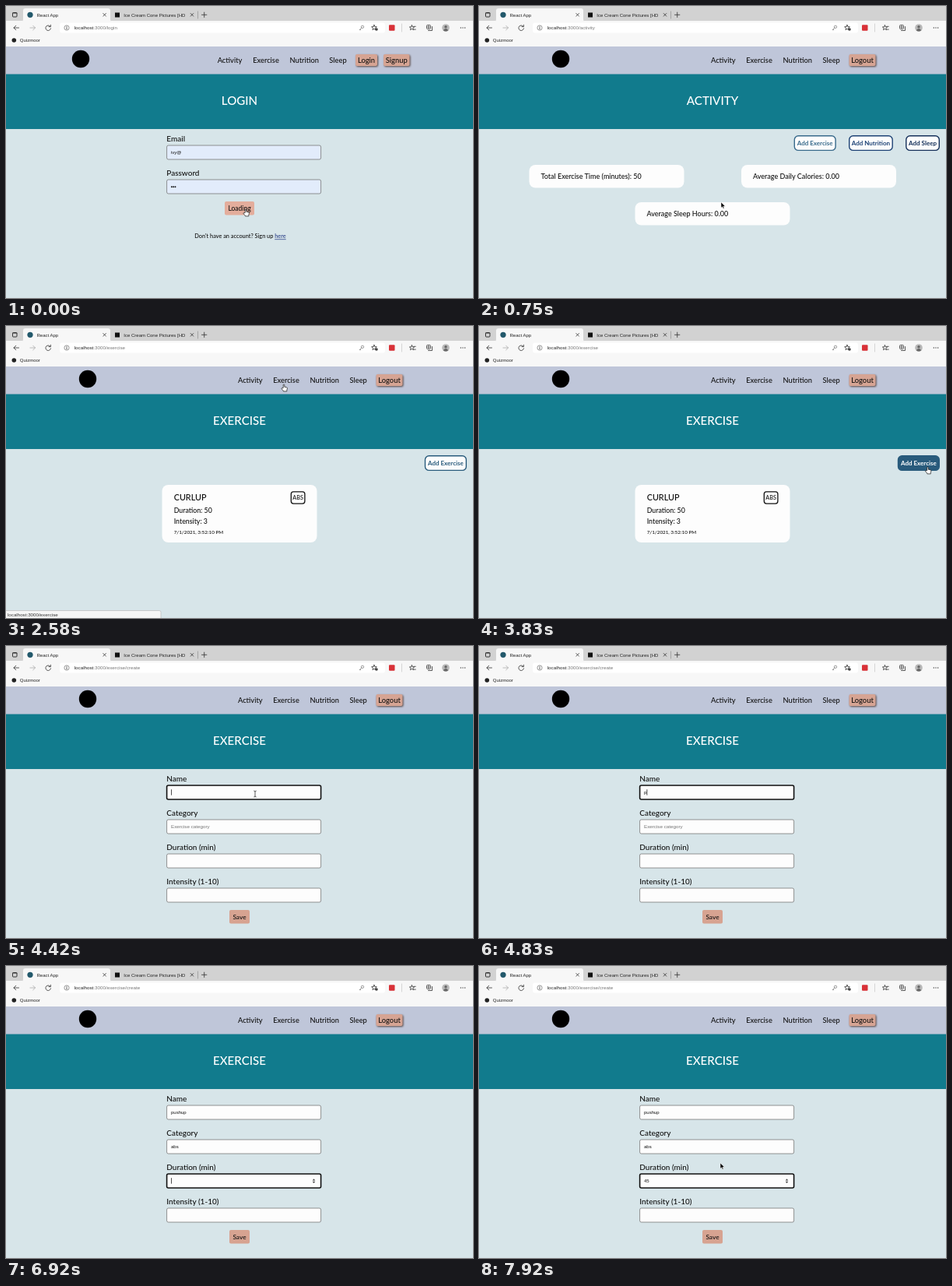
An HTML page for the animation above (8000 ms loop, 600 by 375 pixels).

```html
<!DOCTYPE html>
<html lang="en">
<head>
<meta charset="utf-8">
<title>Fitness tracker</title>
<style>
html, body { margin: 0; width: 100%; height: 100%; overflow: hidden; background: #d7e5e9; }
svg { display: block; width: 600px; height: 375px; }
text { font-family: Lato, "Open Sans", sans-serif; font-weight: 500; white-space: pre; }
text.ui { font-family: "Liberation Sans", Arial, sans-serif; font-weight: 400; }
.mid { text-anchor: middle; }
.line { fill: none; stroke: #333; stroke-width: .8; stroke-linecap: round; stroke-linejoin: round; }
.add rect { fill: #fdfdfd; stroke: var(--tone); stroke-width: 1.4; }
.add text { fill: var(--tone); font-weight: 700; }
.add.hover rect { fill: var(--tone); }
.add.hover text { fill: #fff; }
.field rect.box { fill: #fdfdfd; stroke: #777; stroke-width: .8; }
.field.focus rect.box { stroke: #111; stroke-width: 1.6; }
.raised { filter: drop-shadow(1.2px 1.2px 1.2px rgba(50, 25, 15, .75)); }
.popup { filter: drop-shadow(0 2px 3px rgba(0, 0, 0, .25)); }
</style>
</head>
<body>
<svg id="stage" viewBox="0 0 600 375"></svg>
<script>
const LOOP = 8000;
const stage = document.getElementById('stage');

// Markup helpers
const rect = (x, y, w, h, fill, rx = 0, extra = '') =>
  `<rect x="${x}" y="${y}" width="${w}" height="${h}" rx="${rx}" fill="${fill}" ${extra}/>`;
const circle = (x, y, r, fill, extra = '') =>
  `<circle cx="${x}" cy="${y}" r="${r}" fill="${fill}" ${extra}/>`;
const text = (x, y, size, str, cls = '', fill = '#111') =>
  `<text x="${x}" y="${y}" font-size="${size}" class="${cls}" fill="${fill}">${str}</text>`;
const line = (d, extra = '') => `<path class="line" d="${d}" ${extra}/>`;
const group = (id, body, extra = '') => `<g id="${id}" ${extra}>${body}</g>`;

const star = (x, y, r) => {
  const points = Array.from({ length: 10 }, (_, i) => {
    const a = i * Math.PI / 5 - Math.PI / 2, d = i % 2 ? r * .45 : r;
    return `${(x + d * Math.cos(a)).toFixed(2)} ${(y + d * Math.sin(a)).toFixed(2)}`;
  });
  return line(`M${points.join('L')}Z`, 'stroke-width=".6"');
};

const browser = () =>
  rect(0, 0, 600, 20, '#d2d2d2') +
  rect(0, 19, 600, 33, '#f7f7f7') +
  '<path d="M19 20q3 0 3-3V6q0-3 3-3h106q3 0 3 3v11q0 3 3 3z" fill="#f7f7f7"/>' +
  rect(8.5, 8.5, 5.5, 5.5, 'none', 1, 'stroke="#222" stroke-width=".9"') +
  line('M8.5 9.2h5.5', 'stroke-width="1.5"') +
  circle(31, 11.3, 3.6, '#22586b') +
  text(39.5, 13.5, 6, 'React App', 'ui', '#222') +
  line('M124.8 9.5l3.6 3.6m0-3.6l-3.6 3.6') +
  rect(140, 8.5, 6, 6, '#111') +
  '<svg x="150" y="4" width="80" height="14">' +
  text(1.3, 9.5, 6, 'Ice Cream Cone Pictures [HD]', 'ui', '#222') + '</svg>' +
  line('M237.2 9.5l3.6 3.6m0-3.6l-3.6 3.6') +
  line('M246.5 7v9', 'style="stroke:#999"') +
  line('M251.5 11.3h6.4m-3.2-3.2v6.4') +
  rect(69, 21.5, 418, 13, '#fff', 3) +
  line('M16.5 28h-6.5m2.8-2.8L10 28l2.8 2.8') +
  line('M31 28h6.5m-2.8-2.8l2.8 2.8-2.8 2.8', 'style="stroke:#aaa"') +
  line('M57 26.4a3.3 3.3 0 1 0 .5 2.4M57.4 24.3v2.3h-2.3') +
  circle(78, 28, 3.1, 'none', 'stroke="#555" stroke-width=".6"') +
  line('M78 27.6v2m0-3.3v.1', 'stroke-width=".6"') +
  circle(458, 26.8, 1.7, 'none', 'stroke="#777" stroke-width=".7"') +
  line('M456.8 28l-2.6 2.6h1.4', 'style="stroke:#777"') +
  star(473, 27.8, 3.5) + circle(476, 30, 1.8, '#444') +
  rect(492, 24.2, 7.5, 7.5, '#d83137', 1) +
  line('M508.5 23v10', 'style="stroke:#ccc"') +
  star(521.5, 28, 3.3) + line('M523.8 26.3h2.5m-2.5 3.8h2.5') +
  rect(540.5, 24.5, 5, 5, 'none', 1, 'stroke="#333" stroke-width=".8"') +
  line('M542.5 31.5h5v-5m-4.5-.8v2.6m-1.3-1.3h2.6') +
  circle(565, 28, 4.8, '#b9b9b9') + circle(565, 26.7, 1.7, '#666') +
  '<path d="M561.8 31.2q3.2-4.2 6.4 0-3.2 2.8-6.4 0z" fill="#666"/>' +
  [584.3, 587, 589.7].map(x => circle(x, 28, .65, '#333')).join('') +
  circle(10.3, 44, 2.8, '#222') +
  text(17.8, 46.2, 6, 'Quizmoor', 'ui', '#222') +
  text(87.7, 30.2, 6.25, '<tspan fill="#222">localhost</tspan><tspan id="path"></tspan>', 'ui', '#777');

const raised = (x, w, label) =>
  rect(x, 62, w, 15, '#d6a493', 2, 'class="raised"') +
  text(x + w / 2, 72.7, 9.4, label, 'mid');

const nav = centres => ['Activity', 'Exercise', 'Nutrition', 'Sleep']
  .map((label, i) => text(centres[i], 72.7, 9.3, label, 'mid')).join('');

const addButton = (id, x, w, label, tone) => group(id,
  rect(x, 166.8, w, 18.6, '', 5) + text(x + w / 2, 178.9, 8, label, 'mid'),
  `class="add" style="--tone:${tone}"`);

const card = (x, y, h = 29.5) => rect(x, y, 199, h, '#fdfdfd', 8);
const stat = (x, y, label) => card(x, y) + text(x + 15, y + 17.6, 9, label);

const field = (id, y, label) => group(id,
  text(206.3, y - 5, 10, label) +
  `<rect class="box" x="206.6" y="${y}" width="198" height="18" rx="2"/>` +
  text(212, y + 11.2, 6, '', 'ui value') +
  `<rect class="caret" y="${y + 5.2}" width=".7" height="7.4" fill="#000"/>`,
  'class="field"');

const loginField = (y, label) => text(206.3, y - 5, 10, label) +
  rect(206.6, y, 198, 18, '#e2ecfb', 2, 'stroke="#777" stroke-width=".8"');

const pages =
  group('login',
    circle(96, 68, 11.2, '#000') + nav([287.5, 334, 383.3, 426.5]) +
    raised(449, 28, 'Login') + raised(485, 33.5, 'Signup') +
    loginField(179, 'Email') + text(211.8, 190.2, 6, 'ivy@', 'ui') +
    loginField(223, 'Password') +
    [212.9, 215.2, 217.5].map(x => circle(x, 232.3, .95, '#111')).join('') +
    rect(281, 251, 38, 17.5, '#e3ad9c', 2) + text(300, 262.5, 8.5, 'Loading', 'mid') +
    text(242.3, 298.4, 7.35, "Don't have an account? Sign up " +
      '<tspan fill="#2a3f86" text-decoration="underline">here</tspan>')) +
  group('member',
    circle(105, 68, 11.2, '#000') + nav([313.8, 360, 409.3, 452.7]) +
    raised(475.5, 34, 'Logout')) +
  group('activity',
    addButton('addExercise', 405.3, 52.8, 'Add Exercise', '#386a8b') +
    addButton('addNutrition', 475.7, 55.5, 'Add Nutrition', '#1d4275') +
    addButton('addSleep', 548.8, 42.5, 'Add Sleep', '#15305a') +
    stat(64.5, 204, 'Total Exercise Time (minutes): 50') +
    stat(337, 204, 'Average Daily Calories: 0.00') +
    stat(200.5, 252, 'Average Sleep Hours: 0.00')) +
  group('exercise',
    addButton('newExercise', 538.5, 52.8, 'Add Exercise', '#295b7c') +
    card(200.5, 204, 74) + text(215.7, 223.8, 10.8, 'CURLUP') +
    rect(366.3, 212.8, 17.6, 15.3, 'none', 3, 'stroke="#111" stroke-width="1.3"') +
    text(375.1, 223.1, 7.2, 'ABS', 'mid') +
    text(215.7, 239.8, 8.8, 'Duration: 50') + text(215.7, 254.4, 8.8, 'Intensity: 3') +
    text(215.7, 266.7, 6.3, '7/1/2021, 3:52:10 PM')) +
  group('create',
    field('name', 179, 'Name') + field('category', 223, 'Category') +
    field('duration', 267, 'Duration (min)') + field('intensity', 311, 'Intensity (1-10)') +
    group('spinner', '<path d="M393.7 275.5l1.8-2.2 1.8 2.2zm0 1.2h3.6l-1.8 2.2z" fill="#444"/>') +
    rect(287, 339, 26, 17.5, '#d7a391', 2) + text(300, 350.6, 8.4, 'Save', 'mid') +
    group('popup', rect(206.5, 241.8, 187.3, 30.3, '#fdfdfd', 1) +
      text(213, 250, 5.4, 'Saved data', 'ui', '#777') +
      text(212, 264, 6, 'abs', 'ui'), 'class="popup"'));

stage.innerHTML =
  rect(0, 0, 600, 375, '#d7e5e9') + browser() +
  rect(0, 52, 600, 36, '#bfc6d9') + rect(0, 87.5, 600, 70.5, '#117b8d') +
  '<text id="heading" class="mid" x="300" y="126.6" font-size="15.1" fill="#fff"></text>' +
  pages +
  group('status', rect(-2, 365.5, 201, 12, '#f6f6f6', 2, 'stroke="#bbb" stroke-width=".7"') +
    text(2, 372.5, 6.2, 'localhost:3000/exercise', 'ui', '#333')) +
  group('cursor',
    group('arrow', '<path d="M0 0v7.2l1.7-1.5 1.1 2.6 1.2-.5-1.1-2.5h2.4z" fill="#000" stroke="#fff" stroke-width=".5"/>') +
    group('hand', '<path d="M-.8 4.6V.8a.8.8 0 0 1 1.6 0v2.4l2.8.6q1 .3.8 1.4l-.6 2.4v1.3h-4.4l-.3-1L-2.9 5.7q-.4-1 .6-1z" fill="#fff" stroke="#111" stroke-width=".7"/>') +
    group('beam', line('M-1.3-4q1.3 0 1.3 1v6q0 1-1.3 1M1.3-4Q0-4 0-3m0 6q0 1 1.3 1')));

const el = Object.fromEntries([...stage.querySelectorAll('[id]')].map(e => [e.id, e]));
const show = (e, on) => e.setAttribute('visibility', on ? 'visible' : 'hidden');

// Timeline: [time, ...state]
const visits = [
  [0, 'login', 'LOGIN', '/login'],
  [330, 'activity', 'ACTIVITY', '/activity'],
  [2540, 'exercise', 'EXERCISE', '/exercise'],
  [4000, 'create', 'EXERCISE', '/exercise/create'],
];
const moves = [
  [0, 308, 261], [330, 308, 261], [700, 311, 252], [920, 311, 252],
  [1200, 432, 178], [1450, 502, 178], [1670, 568, 178], [1800, 568, 178],
  [2330, 357, 75], [2750, 357, 75], [3450, 576.5, 181], [4000, 576.5, 181],
  [4180, 320, 190], [4700, 320, 190], [7750, 310, 253], [8000, 310, 253],
];
const hiddenPointer = [4700, 7750];
const keys = [
  [4250, 'name', ''], [4750, 'name', 'p'], [5080, 'name', 'pu'], [5170, 'name', 'pus'],
  [5330, 'name', 'push'], [5420, 'name', 'pushu'], [5500, 'name', 'pushup'],
  [5750, 'category', ''], [6080, 'category', 'a'], [6330, 'category', 'ab'], [6420, 'category', 'abs'],
  [6600, 'duration', ''], [7080, 'duration', '4'], [7330, 'duration', '45'],
];
// Hover zones: page, pointer, x, y, width, height, highlighted element
const zones = [
  ['login', 'hand', 281, 251, 38, 18],
  ['activity', 'hand', 405, 166, 53, 20, 'addExercise'],
  ['activity', 'hand', 475, 166, 56, 20, 'addNutrition'],
  ['activity', 'hand', 548, 166, 44, 20, 'addSleep'],
  ['activity', 'hand', 343, 62, 35, 16, 'status'],
  ['exercise', 'hand', 343, 62, 35, 16, 'status'],
  ['exercise', 'hand', 538, 166, 54, 20, 'newExercise'],
  ['create', 'beam', 206, 179, 199, 18],
];

const latest = (table, t) => table.filter(row => row[0] <= t).pop();
const ease = u => u * u * (3 - 2 * u);

function pointerAt(t) {
  const i = Math.max(1, moves.findIndex(m => m[0] > t));
  const [t0, x0, y0] = moves[i - 1], [t1, x1, y1] = moves[i];
  const u = ease((t - t0) / (t1 - t0));
  return [x0 + (x1 - x0) * u, y0 + (y1 - y0) * u];
}

function drawForm(t, open) {
  const [since, focus, typed] = latest(keys, t) || [0, '', ''];
  for (const id of ['name', 'category', 'duration', 'intensity']) {
    const box = el[id], value = box.querySelector('.value'), caret = box.querySelector('.caret');
    const content = (latest(keys.filter(k => k[1] === id), t) || [0, id, ''])[2];
    const hint = id === 'category' && !content;
    value.textContent = hint ? 'Exercise category' : content;
    value.setAttribute('fill', hint ? '#757575' : '#111');
    value.setAttribute('font-size', hint ? 6.25 : 6);
    box.classList.toggle('focus', id === focus);
    caret.setAttribute('x', 212 + (content ? value.getComputedTextLength() + .2 : 0));
    show(caret, open && id === focus && (t - since) % 1000 < 500);
  }
  show(el.popup, open && focus === 'category' && typed);
  show(el.spinner, open && focus === 'duration');
}

function draw(t) {
  const [, page, heading, path] = latest(visits, t);
  for (const [, id] of visits) show(el[id], id === page);
  show(el.member, page !== 'login');
  el.heading.textContent = heading;
  el.path.textContent = ':3000' + path;

  const [x, y] = pointerAt(t);
  const zone = zones.find(([p, , zx, zy, w, h]) =>
    p === page && x >= zx && x <= zx + w && y >= zy && y <= zy + h);
  const kind = zone ? zone[1] : 'arrow', lit = zone && zone[6];
  const shown = t < hiddenPointer[0] || t >= hiddenPointer[1];
  el.cursor.setAttribute('transform', `translate(${x.toFixed(2)} ${y.toFixed(2)})`);
  for (const id of ['arrow', 'hand', 'beam']) show(el[id], shown && id === kind);
  for (const b of stage.querySelectorAll('.add')) b.classList.toggle('hover', b.id === lit);
  show(el.status, lit === 'status');
  drawForm(t, page === 'create');
}

const start = performance.now();
function tick() {
  draw((performance.now() - start) % LOOP);
  requestAnimationFrame(tick);
}
tick();
</script>
</body>
</html>
```
